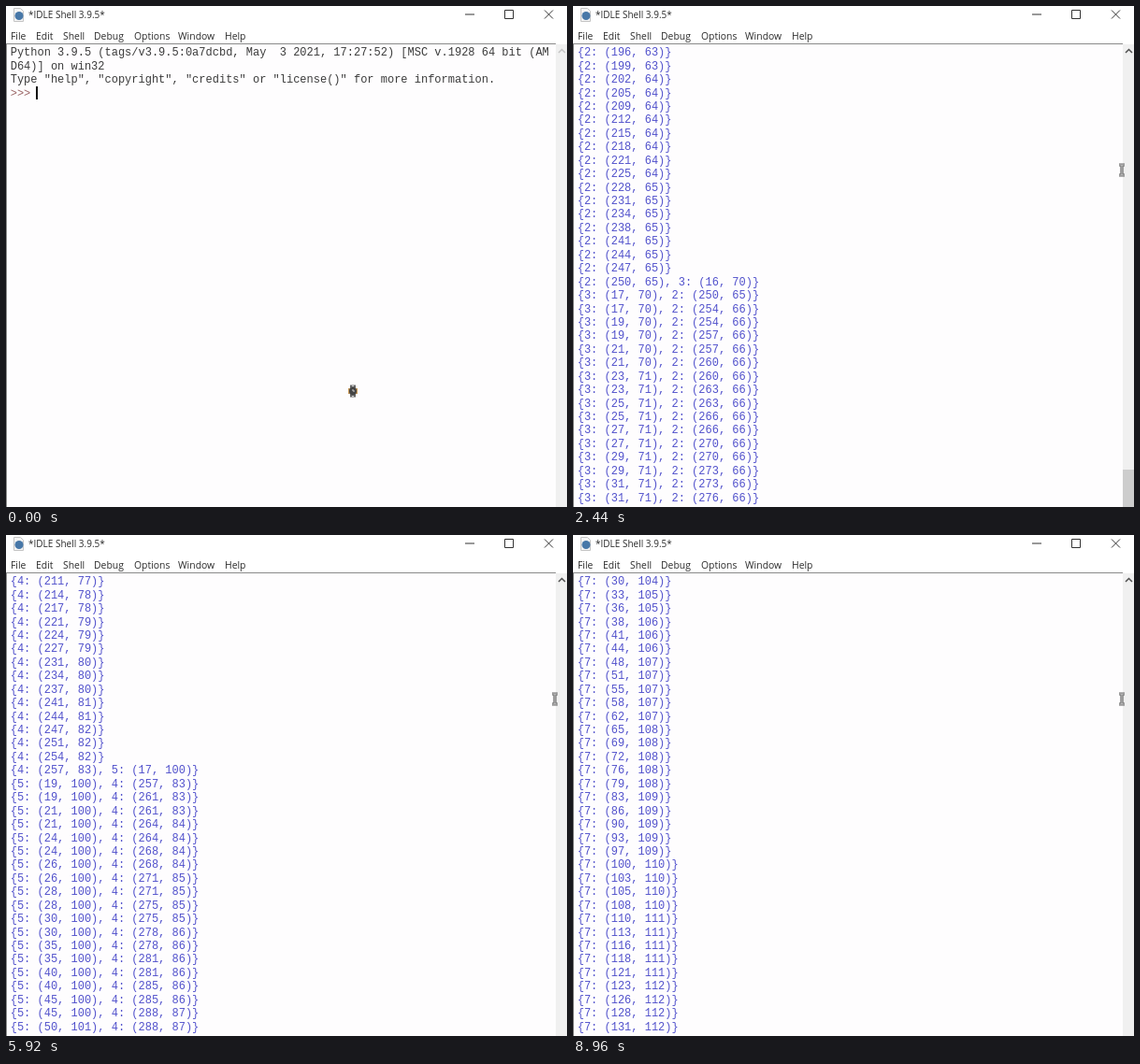
Write an HTML page that moves like this. It is 600 px wide and 536 px high and loops after 9000 ms.

```html
<!DOCTYPE html>
<html lang="en">
<head>
<meta charset="utf-8">
<title>Shell log</title>
<style>
  html, body { margin: 0; width: 100%; height: 100%; overflow: hidden; background: #fff; }
  #stage { position: relative; width: 600px; height: 536px; overflow: hidden; background: #fff; }
  #stage > * { position: absolute; }
  .ui { font: 10.4px/14px "Open Sans", sans-serif; color: #2c2c2c; white-space: pre; }
  #paper { left: 0; top: 40px; width: 588px; height: 500px; box-sizing: border-box;
    background: #fefdfe; border: 1px solid #8a8a8a; border-right: 0; }
  #bar { left: 588px; top: 41px; width: 12px; height: 495px; background: #f0f0f0; }
  #thumb { left: 588px; width: 12px; height: 536px; background: #cdcdcd; }
  #rows { left: 4.7px; top: 43.2px; font: 12px/14.45px "Liberation Mono", monospace; }
  #rows div { height: 14.45px; white-space: pre; color: #5252cc; }
  #rows .info { color: #3c3c3c; }
  #rows .prompt { color: #9a6464; }
  #caret { left: 32px; top: 86px; width: 2px; height: 14px; background: #111; }
  svg { left: 0; top: 0; }
</style>
</head>
<body>
<div id="stage">
  <div class="ui" style="left:24px;top:2px;font-size:10px">*IDLE Shell 3.9.5*</div>
  <div id="paper"></div>
  <div id="bar"></div>
  <div id="thumb"></div>
  <div id="rows"></div>
  <div id="caret"></div>
  <svg width="600" height="536" fill="none">
    <path d="M8.5 2.5h7l3 3v11h-10z" fill="#f4f4f4" stroke="#c4c4c4"/>
    <circle cx="14" cy="10.5" r="4.5" fill="#4878a8"/>
    <path d="M491 9h10M533.5 4.5h9v9h-9zM576 4.5l9 9M585 4.5l-9 9" stroke="#333"/>
    <path id="arrow" d="M591 50l3.5-3.5l3.5 3.5" stroke-width="1.5"/>
    <g id="watch">
      <path d="M-3-6.5h6v13h-6z" fill="#666"/>
      <path d="M-5-3h10v6h-10z" fill="#c99a5a"/>
      <circle r="4" fill="#444"/>
      <path d="M0-2v2h2M-1-5.5h2M-1 5.5h2" stroke="#ccc"/>
    </g>
    <g id="beam">
      <path d="M-3-5.5h6M0-5.5v11M-3 5.5h6" stroke="#666" stroke-width="3.2"/>
      <path d="M-3-5.5h6M0-5.5v11M-3 5.5h6" stroke="#d0d0d0"/>
    </g>
  </svg>
</div>
<script>
const LOOP = 9000, TICK = 40, STEP = 12.8, ORIGIN = 1352, VISIBLE = 34;
const $ = id => document.getElementById(id);

// A tracked object drifts through a few key points [step, x, y].
const track = (id, ...keys) => ({ id, keys, from: keys[0][0], to: keys[keys.length - 1][0] });
const tracks = [
  track(1, [-82, 17, 64], [-11, 246, 82.6], [26, 377, 92.6]),
  track(2, [0, 18, 57], [10, 35, 57], [117, 379, 70.5]),
  track(3, [77, 15.5, 70], [85, 31, 71], [152, 256, 75.7], [210, 444, 97]),
  track(3, [238, 447, 97], [260, 490, 99]),
  track(4, [274, 15, 56], [347, 257.2, 82.6], [383, 382, 100]),
  track(5, [347, 17, 100], [353, 30.4, 100], [442, 470, 114]),
  track(6, [394, 17, 62], [452, 197, 79.8], [544, 480, 96]),
  track(7, [556, 17, 101.5], [565, 41, 106.2], [582, 100, 109.7], [594, 131, 112.2])
];

function entry({ id, keys }, s) {
  const i = Math.max(1, keys.findIndex(key => key[0] >= s));
  const a = keys[i - 1], b = keys[i];
  const k = (s - a[0]) / (b[0] - a[0]);
  const at = c => Math.round(a[c] + (b[c] - a[c]) * k);
  return `${id}: (${at(1)}, ${at(2)})`;
}

const log = [
  ["Python 3.9.5 (tags/v3.9.5:0a7dcbd, May  3 2021, 17:27:52) [MSC v.1928 64 bit (AM", "info"],
  ["D64)] on win32", "info"],
  ['Type "help", "copyright", "credits" or "license()" for more information.', "info"],
  [">>> ", "prompt"]
].map(([text, kind]) => ({ text, kind, at: -Infinity }));
const intro = log.length;

const print = (at, ...parts) => log.push({ text: `{${parts.join(", ")}}`, kind: "", at });

// Two live objects are updated in turn, so they print twice per step.
for (let s = tracks[0].from; s <= tracks[tracks.length - 1].to; s++) {
  const [old, young] = tracks.filter(o => s >= o.from && s <= o.to);
  if (!old) continue;
  if (!young) { print(s, entry(old, s)); continue; }
  const pair = (at, so) => {
    const parts = [entry(old, so), entry(young, s)];
    print(at, ...(young.id === 2 || s === young.from ? parts : parts.reverse()));
  };
  if (s > young.from) pair(s - 0.5, s - 1);
  pair(s, s);
}

const rows = Array.from({ length: VISIBLE }, () => $("rows").appendChild(document.createElement("div")));

const menu = { File: 5, Edit: 32, Shell: 61, Debug: 94, Options: 137, Window: 184, Help: 234 };
for (const [name, x] of Object.entries(menu)) {
  const item = document.createElement("div");
  item.className = "ui";
  item.textContent = name;
  item.style.cssText = `left:${x}px;top:25px`;
  $("stage").appendChild(item);
}

function draw(t) {
  const step = (t - ORIGIN) / STEP + 1e-6;
  let n = log.findIndex(line => line.at > step);
  if (n < 0) n = log.length;
  const top = Math.max(0, n - VISIBLE);
  rows.forEach((row, i) => {
    const line = top + i < n ? log[top + i] : { text: "", kind: "" };
    row.textContent = line.text;
    row.className = line.kind;
  });

  const idle = n === intro;
  $("caret").style.display = idle ? "" : "none";
  $("thumb").style.display = top ? "" : "none";
  $("thumb").style.top = 57 + 526 * (1 - VISIBLE / n) + "px";
  $("arrow").setAttribute("stroke", top ? "#505050" : "#c4c4c4");

  const k = Math.min(1, Math.max(0, (t - 120) / 600));
  const e = k * k * (3 - 2 * k);
  const place = `translate(${371 + 216 * e} ${412 - 236.5 * e})`;
  for (const id of ["watch", "beam"]) {
    $(id).setAttribute("transform", place);
    $(id).style.display = (id === "watch") === idle ? "" : "none";
  }
}

let shown = -1;
const start = performance.now();
function frame() {
  const t = Math.floor(Math.max(0, performance.now() - start) % LOOP / TICK) * TICK;
  if (t !== shown) draw(shown = t);
  requestAnimationFrame(frame);
}
frame();
</script>
</body>
</html>
```
